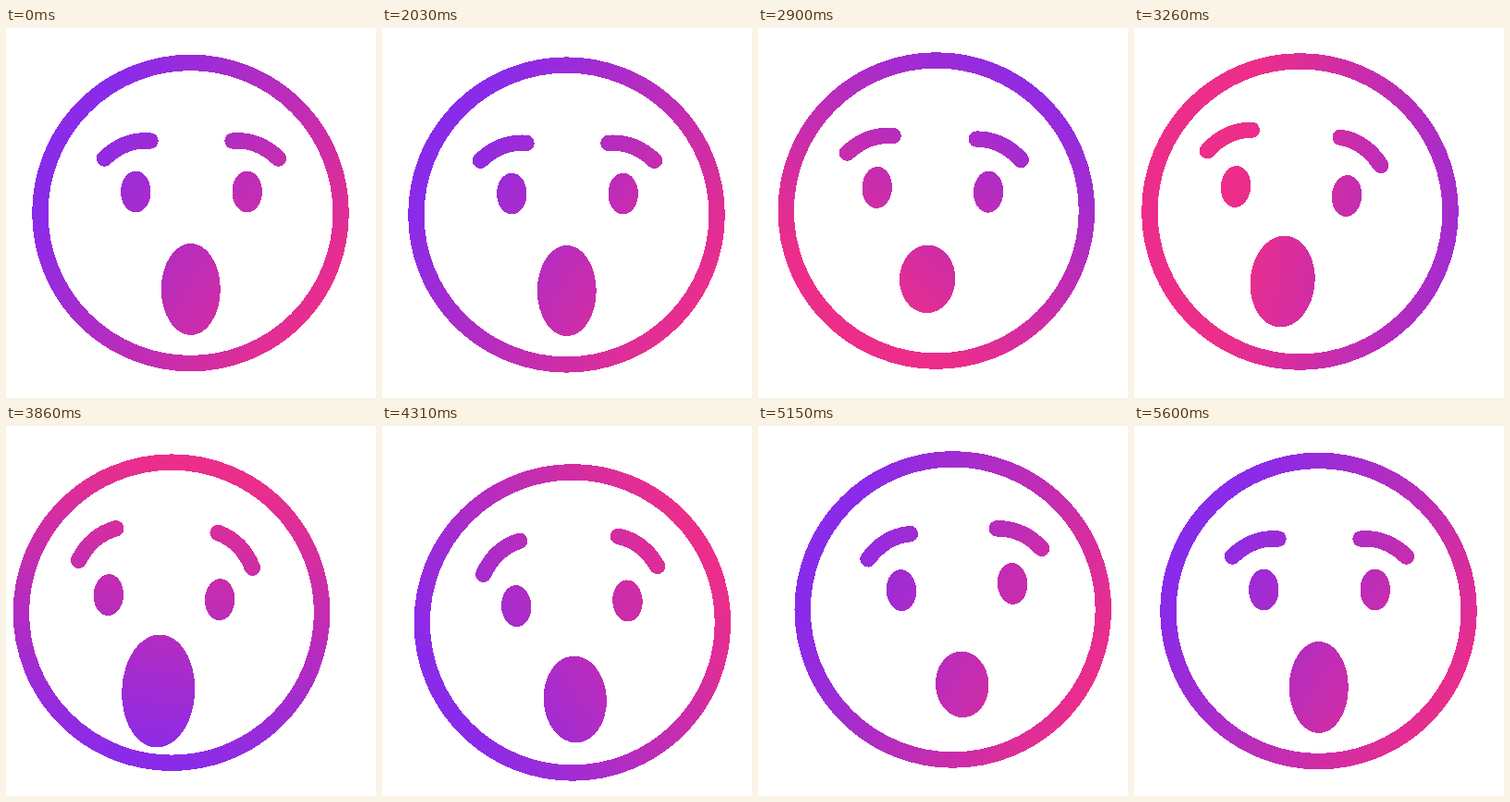
Write an HTML page that moves like this. It is 400 px wide and 400 px high and loops after 5630 ms.

```html
<!DOCTYPE html>
<html lang="en">
<head>
<meta charset="utf-8">
<title>Surprised face</title>
<style>
html, body { margin: 0; width: 100%; height: 100%; overflow: hidden; background: #fff; }
svg { display: block; width: 100vw; height: 100vh; }
</style>
</head>
<body>
<svg viewBox="0 0 400 400" shape-rendering="crispEdges">
  <defs>
    <linearGradient id="tint" gradientUnits="userSpaceOnUse">
      <stop offset="0" stop-color="#8a2be9"/>
      <stop offset="1" stop-color="#ec2e8a"/>
    </linearGradient>
    <mask id="shape" maskUnits="userSpaceOnUse" x="0" y="0" width="400" height="400">
      <g id="face" fill="#fff">
        <circle r="162.6" fill="none" stroke="#fff" stroke-width="17.4"/>
        <g id="features">
          <ellipse class="eye" cx="-60.2" rx="16.2"/>
          <ellipse class="eye" cx="60.2" rx="16.2"/>
          <g fill="none" stroke="#fff" stroke-width="17.4" stroke-linecap="round">
            <path class="brow" d="M-94-36Q-72-57-44.5-55"/>
            <g transform="scale(-1 1)"><path class="brow" d="M-94-36Q-72-57-44.5-55"/></g>
          </g>
          <ellipse id="mouth"/>
        </g>
      </g>
    </mask>
  </defs>
  <rect width="400" height="400" fill="url(#tint)" mask="url(#shape)"/>
</svg>
<script>
const LOOP = 5630, HOLD = 2030, STEP = 30;
const $ = id => document.getElementById(id);
const set = (el, attrs) => { for (const k in attrs) el.setAttribute(k, attrs[k]); };

// Smooth curve through [time, value] keys, flat at every turning point.
function track(...keys) {
  const n = keys.length - 1;
  const rate = i => (keys[i + 1][1] - keys[i][1]) / (keys[i + 1][0] - keys[i][0]);
  const slope = keys.map((_, i) => {
    if (i === 0 || i === n) return 0;
    const a = rate(i - 1), b = rate(i);
    return a * b > 0 ? 2 * a * b / (a + b) : 0;
  });
  return t => {
    if (t <= keys[0][0]) return keys[0][1];
    if (t >= keys[n][0]) return keys[n][1];
    let i = 0;
    while (t > keys[i + 1][0]) i++;
    const [t0, v0] = keys[i], [t1, v1] = keys[i + 1];
    const d = t1 - t0, u = (t - t0) / d, w = 1 - u;
    return v0 * (1 + 2 * u) * w * w + v1 * u * u * (3 - 2 * u)
      + d * u * w * (slope[i] * w - slope[i + 1] * u);
  };
}

const pose = {
  x: track([2570, 0], [3140, -15], [3260, -20], [3560, -25.5], [3710, -24.5], [3860, -20.5],
    [4280, 5], [4850, 24.5], [5420, 0]),
  y: track([2000, 0], [2030, 2], [2240, 30], [2500, -14], [3080, 1], [3260, -1.5], [3600, -5],
    [3710, -4], [3860, 1.7], [4180, 14], [4280, 13], [4850, -8], [5390, 3], [5600, 0]),
  squash: track([2000, 1], [2030, 0.996], [2240, 0.955], [2460, 1]),
  tilt: track([2570, 0], [3260, 4.8], [3860, 2.4], [4850, -7.6], [5420, 0]),
  lookX: track([2570, 0], [3260, -10.5], [3860, -9], [4850, 7], [5420, 0]),
  lookY: track([2570, 0], [3260, 1], [3860, 6.5], [4850, -3], [5420, 0]),
  eye: track([2240, 22.5], [2490, 12.5], [2800, 22.5]),
  brow: track([2000, 0], [2480, 3], [3260, -9], [3860, -22], [4850, -12], [5600, 0]),
  mouthX: track([2000, -0.7], [2480, -3], [3260, -1.2], [3860, -2], [4850, -0.7]),
  mouthY: track([2000, 105.5], [2480, 96], [3260, 98], [3860, 101.5], [4850, 105.4], [5600, 105.5]),
  mouthRx: track([2000, 32], [2480, 26.3], [3260, 35], [3860, 39.5], [4850, 27], [5600, 32]),
  mouthRy: track([2000, 49.5], [2480, 26.3], [3260, 49.5], [3860, 61], [4850, 28.3], [5600, 49.5]),
  hueTurn: track([2000, 212], [2480, 245], [3260, 367], [3860, 460], [4850, 553], [5600, 572]),
  hueX: track([2000, 217], [2480, 215], [3260, 275], [3860, 185], [4850, 230], [5600, 217]),
  hueY: track([2000, 211], [2480, 195], [3260, 200], [3860, 203], [4850, 195], [5600, 211])
};

const face = $('face'), features = $('features'), mouth = $('mouth'), tint = $('tint');
const eyes = document.querySelectorAll('.eye'), brows = document.querySelectorAll('.brow');

function draw(t) {
  const p = {};
  for (const k in pose) p[k] = pose[k](t);
  set(face, { transform: `translate(${199.5 + p.x} ${200 + p.y}) scale(1 ${p.squash})` });
  set(features, { transform: `translate(${1 + p.lookX} ${p.lookY - 23}) rotate(${p.tilt})` });
  eyes.forEach(e => set(e, { ry: p.eye }));
  brows.forEach(b => set(b, { transform: `rotate(${p.brow} -94 -36)` }));
  set(mouth, { cx: p.mouthX, cy: p.mouthY, rx: p.mouthRx, ry: p.mouthRy });
  const a = p.hueTurn * Math.PI / 180, dx = 160 * Math.cos(a), dy = 160 * Math.sin(a);
  set(tint, { x1: p.hueX + dx, y1: p.hueY + dy, x2: p.hueX - dx, y2: p.hueY - dy });
}

const start = performance.now();
function tick() {
  const t = (performance.now() - start) % LOOP;
  draw(t < HOLD ? 0 : HOLD + Math.floor((t - HOLD) / STEP) * STEP);
  requestAnimationFrame(tick);
}
tick();
</script>
</body>
</html>
```
